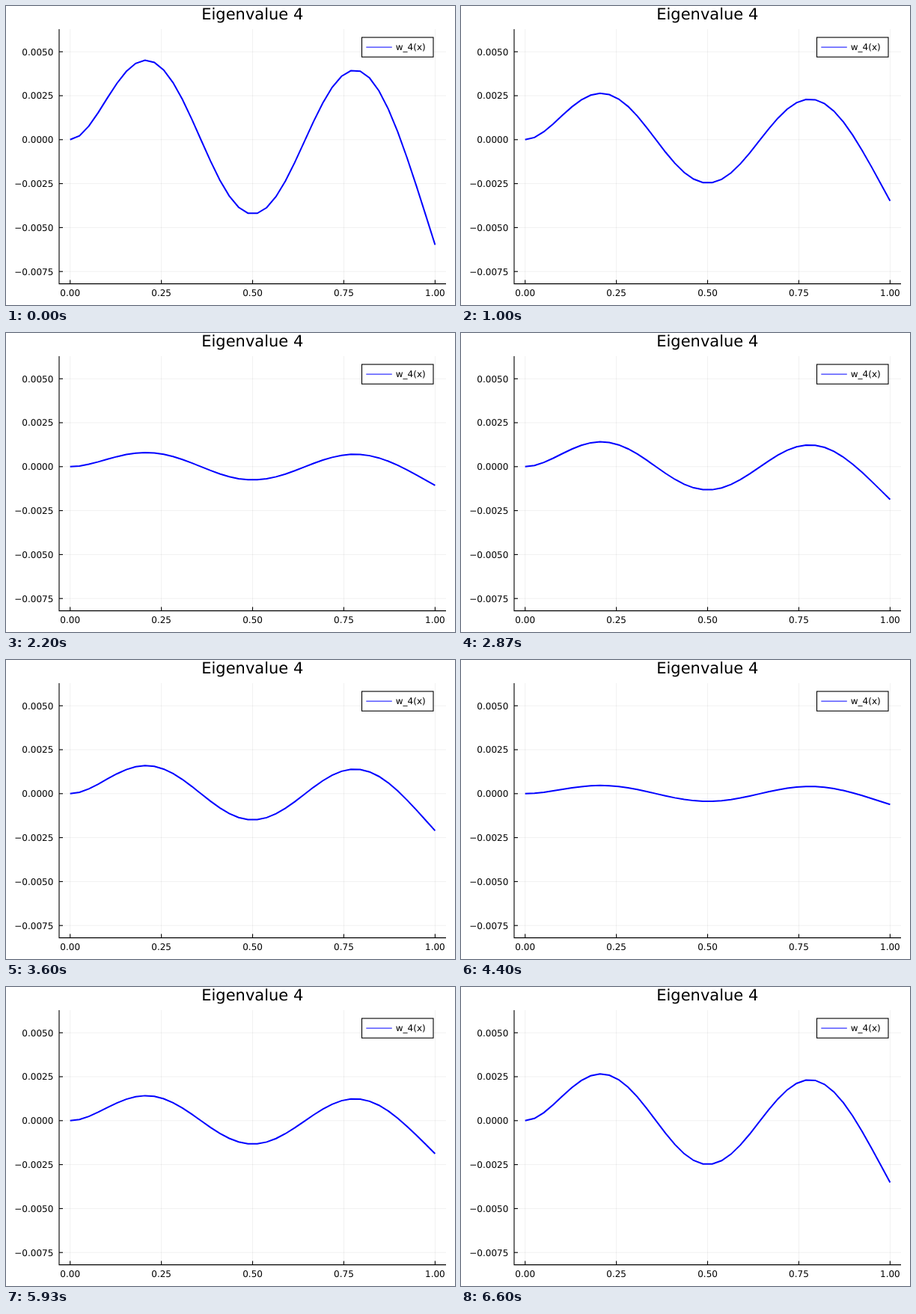
An HTML page that plays this animation: 600x400 px, repeating every 6670 ms.

```html
<!DOCTYPE html>
<html lang="en">
<head>
<meta charset="utf-8">
<title>Eigenvalue 4</title>
<style>
  html, body { margin: 0; width: 100%; height: 100%; overflow: hidden; background: #fff; }
  svg { display: block; width: 600px; height: 400px; }
  text { font: 12px "DejaVu Sans", sans-serif; fill: #000; text-rendering: geometricPrecision; }
  .title { font-size: 21px; }
  .grid { stroke: #000; stroke-opacity: .1; stroke-width: .6; }
  .axis { stroke: #000; stroke-width: 1.1; fill: none; }
  .curve { stroke: #00f; stroke-width: 2; fill: none; }
</style>
</head>
<body>
<svg id="stage" viewBox="0 0 600 400"></svg>
<script>
const stage = document.getElementById("stage");
const LOOP = 6670;
const LEFT = 71, RIGHT = 588, TOP = 31, BOTTOM = 371.6;
const SEGMENTS = 39;
const TIP = 0.00598;
const px = x => 85.7 + 487.7 * x;
const py = y => 178.8 - 23520 * y;

function add(tag, attrs, text = "") {
  const el = document.createElementNS("http://www.w3.org/2000/svg", tag);
  for (const name in attrs) el.setAttribute(name, attrs[name]);
  el.textContent = text;
  return stage.appendChild(el);
}
const line = (cls, x1, y1, x2, y2) => add("line", { class: cls, x1, y1, x2, y2 });
const label = (text, x, y, anchor, cls = "") =>
  add("text", { x, y, "text-anchor": anchor, class: cls }, text);

const xTicks = [0, 0.25, 0.5, 0.75, 1];
const yTicks = [0.005, 0.0025, 0, -0.0025, -0.005, -0.0075];

for (const v of xTicks) line("grid", px(v), TOP, px(v), BOTTOM);
for (const v of yTicks) line("grid", LEFT, py(v), RIGHT, py(v));
add("path", { class: "axis", d: `M${LEFT} ${TOP}V${BOTTOM}H${RIGHT}` });
for (const v of xTicks) {
  line("axis", px(v), BOTTOM, px(v), BOTTOM - 5);
  label(v.toFixed(2), px(v), 387.5, "middle");
}
for (const v of yTicks) {
  line("axis", LEFT, py(v), LEFT + 5, py(v));
  label(v.toFixed(4).replace("-", "\u2212"), 63.3, py(v) + 4.4, "end");
}
label("Eigenvalue 4", 329.3, 18.3, "middle", "title");

const curve = add("polyline", { class: "curve" });

add("rect", { x: 475.5, y: 42, width: 95.5, height: 26.2, fill: "#fff", stroke: "#000", "stroke-width": 1.1 });
add("line", { x1: 481.3, y1: 55.1, x2: 515.8, y2: 55.1, stroke: "#00f", "stroke-width": 1 });
label("w_4(x)", 520.8, 59.4, "start");

// Fourth bending mode of a clamped-free beam, scaled to -1 at the tip.
const BETA = 10.99554073;
const SIGMA = (Math.cosh(BETA) + Math.cos(BETA)) / (Math.sinh(BETA) + Math.sin(BETA));
function mode(x) {
  const b = BETA * x;
  return (Math.cosh(b) - Math.cos(b) - SIGMA * (Math.sinh(b) - Math.sin(b))) / 2;
}
const shape = Array.from({ length: SEGMENTS + 1 }, (_, i) => [i / SEGMENTS, TIP * mode(i / SEGMENTS)]);

// Amplitude over time steps: a smooth curve through a few knots.
const knots = [
  [-6, .92], [0, 1], [6, .92], [11, .752], [15, .583], [21, .342], [28, .18], [33, .178],
  [42, .3], [49.5, .378], [54, .353], [63, .171], [66, .103], [72, 0], [78, .015],
  [84, .147], [95, .511], [99, .588], [103, .61]
];
function slope(i) {
  const [a, b, c] = [knots[i - 1], knots[i], knots[i + 1]];
  const before = b[0] - a[0], after = c[0] - b[0];
  return ((b[1] - a[1]) / before * after + (c[1] - b[1]) / after * before) / (before + after);
}
function amplitude(step) {
  let i = 1;
  while (i < knots.length - 3 && knots[i + 1][0] <= step) i++;
  const [k0, v0] = knots[i], [k1, v1] = knots[i + 1];
  const width = k1 - k0, u = (step - k0) / width, w = 1 - u;
  return v0 * w * w * (1 + 2 * u) + v1 * u * u * (3 - 2 * u)
    + width * u * w * (slope(i) * w - slope(i + 1) * u);
}

// Steps last 70, 60 and 70 ms in turn.
function stepAt(time) {
  const rest = time % 200;
  return 3 * Math.floor(time / 200) + (rest >= 70) + (rest >= 130);
}

function render(time) {
  const a = amplitude(stepAt(time % LOOP));
  curve.setAttribute("points",
    shape.map(([x, y]) => `${px(x).toFixed(2)},${py(a * y).toFixed(2)}`).join(" "));
}

const start = performance.now();
function tick() {
  render(performance.now() - start);
  requestAnimationFrame(tick);
}
tick();
</script>
</body>
</html>
```
